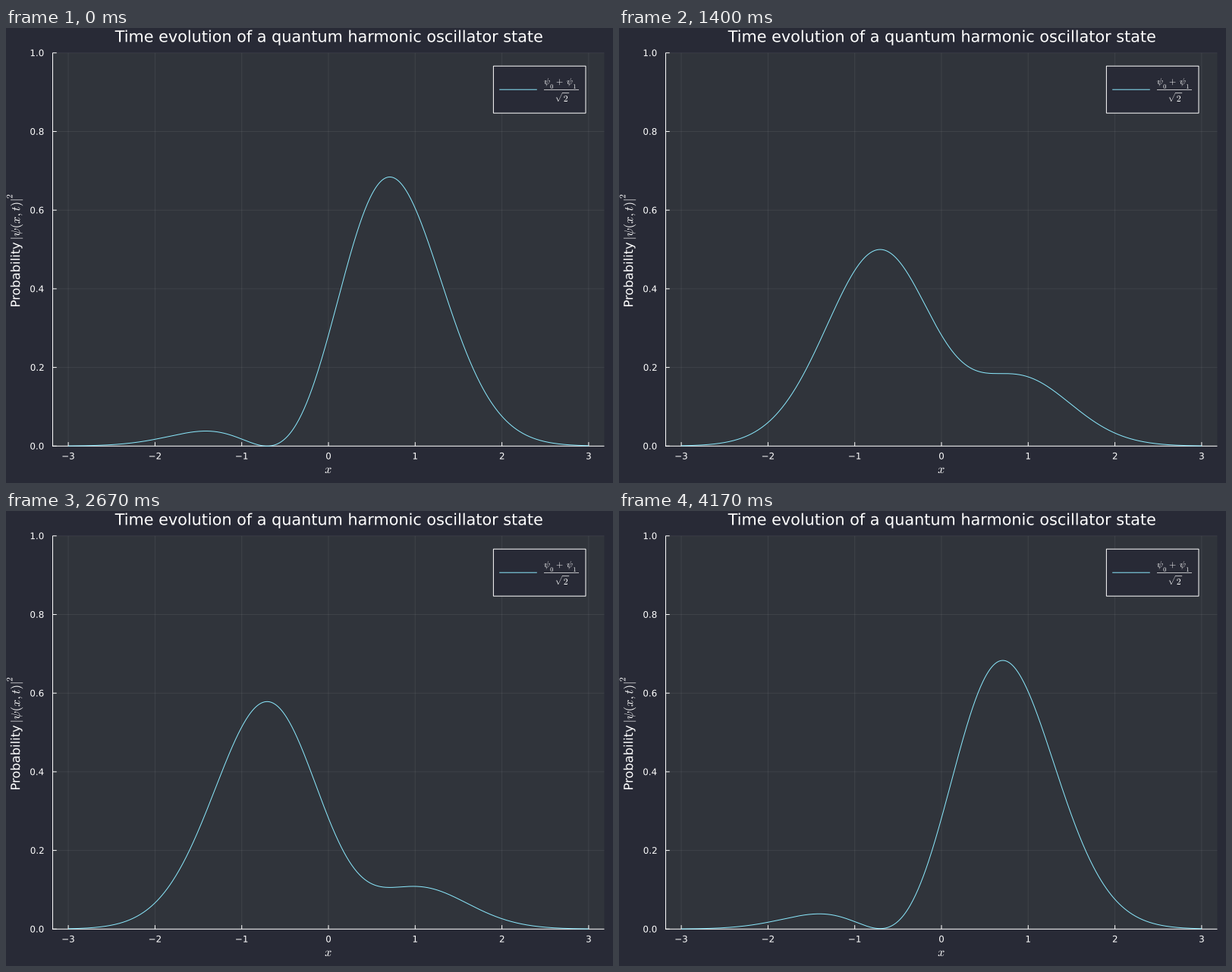
These frames come from a looping animation (800 px wide and 600 px high, 4.21 s). A matplotlib script:

```python
import matplotlib.pyplot as plt
import numpy as np
from matplotlib.animation import FuncAnimation
from matplotlib.patches import PathPatch, Rectangle
from matplotlib.textpath import TextPath
from matplotlib.transforms import Affine2D

plt.rcParams["mathtext.fontset"] = "cm"

W, H, DPI = 800, 600, 100
FRAMES, LOOP_MS = 126, 4210
PHASE_STEP = 0.05

BG, PANEL = "#282a36", "#30343b"
FG, CURVE = "#ffffff", "#8be9fd"
PX = 72 / DPI  # one pixel in points

# Plot area in pixels, y pointing down
X0, X_UNIT, X_LIM = 425.0, 114.3, 3.18
Y0, Y_UNIT = 551.3, 518.5
LEFT, RIGHT, TOP = X0 - X_LIM * X_UNIT, X0 + X_LIM * X_UNIT, Y0 - Y_UNIT
TITLE, GUIDE, SMALL = 20.76, 16.3, 11.86

fig = plt.figure(figsize=(W / DPI, H / DPI), dpi=DPI, facecolor=BG)
ax = fig.add_axes([0, 0, 1, 1])
ax.set_xlim(0, W)
ax.set_ylim(H, 0)
ax.axis("off")


def px(x):
    return X0 + X_UNIT * x


def py(y):
    return Y0 - Y_UNIT * y


def line(xs, ys, color=FG, width=1.0, **kw):
    kw.setdefault("solid_capstyle", "butt")
    return ax.plot(xs, ys, color=color, lw=width * PX, snap=False, **kw)[0]


def box(x, y, w, h, fill, edge="none", z=0):
    ax.add_patch(Rectangle((x, y), w, h, fc=fill, ec=edge, lw=PX,
                           snap=False, zorder=z))


def label(x, y, text, size, align="origin", angle=0):
    """Text with its baseline at y; align refers to the inked width."""
    path = TextPath((0, 0), text, size=size, prop={"family": "DejaVu Sans"})
    ink = path.get_extents()
    shift = {"origin": 0, "center": (ink.x0 + ink.x1) / 2, "right": ink.x1}[align]
    place = Affine2D().translate(-shift, 0).scale(1, -1).rotate_deg(-angle)
    place.translate(x, y)
    ax.add_patch(PathPatch(path, fc=FG, lw=0, zorder=5,
                           transform=place + ax.transData))


def draw_axes():
    box(LEFT, TOP, RIGHT - LEFT, Y0 - TOP, PANEL)
    for v in range(-3, 4):
        x = px(v)
        line([x, x], [TOP, Y0], alpha=0.07, zorder=1)
        line([x, x], [Y0, Y0 - 5.2], zorder=2)
        label(x, 568.6, str(v).replace("-", "\u2212"), SMALL, "center")
    for v in np.arange(6) / 5:
        y = py(v)
        line([LEFT, RIGHT], [y, y], alpha=0.07, zorder=1)
        line([LEFT, LEFT + 5.2], [y, y], zorder=2)
        label(49.5, y + 4.3, f"{v:.1f}", SMALL, "right")
    line([LEFT, LEFT], [TOP, Y0 + 0.5], zorder=2)
    line([LEFT - 0.5, RIGHT], [Y0, Y0], zorder=2)


def draw_titles():
    label(425.2, 18.4, "Time evolution of a quantum harmonic oscillator state",
          TITLE, "center")
    label(424.6, 587, "$x$", GUIDE, "center")
    label(18.2, 368.5, "Probability", GUIDE, angle=90)
    label(18.2, 279.4, r"$|\psi(x,t)|$", GUIDE, angle=90)
    label(8.4, 225, "$2$", 0.7 * GUIDE, angle=90)


def draw_legend():
    box(642.4, 50.2, 121.6, 62, BG, FG, z=3)
    line([650.2, 699.8], [81.2, 81.2], CURVE, zorder=4)
    for x, y, text, scale in [(709, 74.3, r"$\psi$", 1), (717.2, 79.8, "$0$", 0.7),
                              (725, 74.3, "$+$", 1), (738.9, 74.3, r"$\psi$", 1),
                              (747.4, 79.8, "$1$", 0.7), (723.6, 97, r"$\sqrt{2}$", 1)]:
        label(x, y, text, SMALL * scale)
    line([709, 755], [81.4, 81.4], width=0.7, zorder=4)


draw_axes()
draw_titles()
draw_legend()

x = np.linspace(-3, 3, 601)
ground = np.pi ** -0.25 * np.exp(-x ** 2 / 2)
excited = np.sqrt(2) * x * ground
curve = line(px(x), py(0 * x), CURVE, zorder=4, solid_joinstyle="round")


def update(i):
    state = (ground + excited * np.exp(-1j * PHASE_STEP * i)) / np.sqrt(2)
    curve.set_ydata(py(np.abs(state) ** 2))
    return curve,


anim = FuncAnimation(fig, update, frames=FRAMES, interval=LOOP_MS / FRAMES,
                     repeat=True, repeat_delay=0, blit=False)
plt.show()
```
